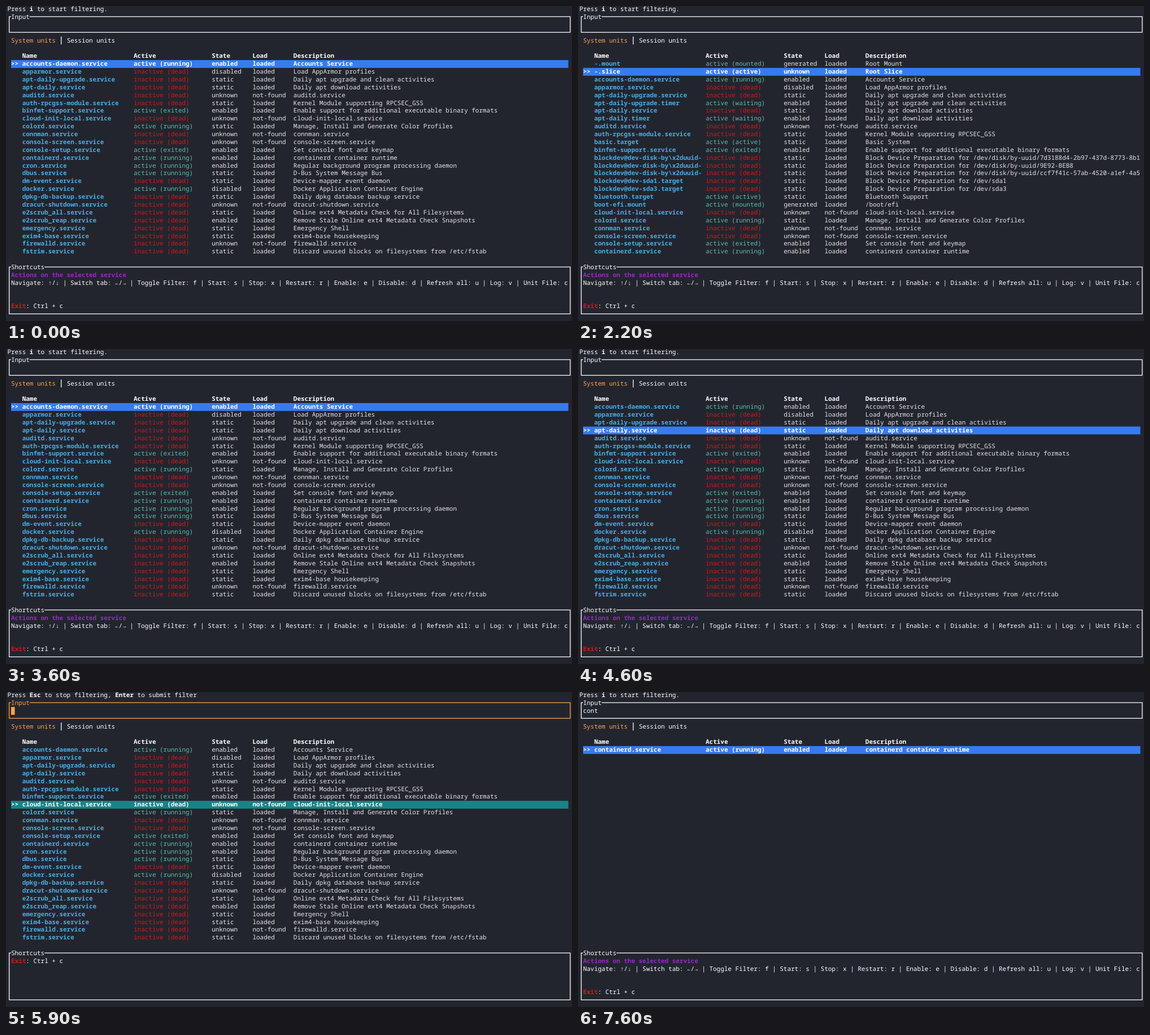
Write an HTML page that moves like this. It is 1002 px wide and 559 px high and loops after 8 s.

```html
<!DOCTYPE html>
<html lang="en">
<head>
<meta charset="utf-8">
<title>Service list</title>
<style>
html, body { margin: 0; width: 100%; height: 100%; overflow: hidden; background: #23252e; }
svg { display: block; }
text {
  font: 10.96px "Noto Sans Mono", "DejaVu Sans Mono", monospace;
  font-variant-ligatures: none;
  text-rendering: geometricPrecision;
  white-space: pre;
}
text.bold { font-weight: 700; }
</style>
</head>
<body>
<svg id="screen" width="1002" height="559"></svg>
<script>
const CELL = 6.577, LINE = 13.88, LEFT = 2.4, TOP = -1.2;
const LOOP = 8000, VISIBLE = 25;
const WHITE = '#fff', GREY = '#e6e6e6', RED = '#d41919', GREEN = '#5ebdab',
  ORANGE = '#fea44c', BLUE = '#367bf0', TEAL = '#198388', SKY = '#49aee6', PURPLE = '#962ac3';

const ACTIVE = {
  d: 'inactive (dead)', r: 'active (running)', e: 'active (exited)',
  m: 'active (mounted)', a: 'active (active)', w: 'active (waiting)'
};
const STATE = { e: 'enabled', d: 'disabled', s: 'static', u: 'unknown', g: 'generated' };

// Each line: name, active and state codes, description (none means the unit was not found).
const units = String.raw`
-.mount mg Root Mount
-.slice au Root Slice
accounts-daemon.service re Accounts Service
apparmor.service dd Load AppArmor profiles
apt-daily-upgrade.service ds Daily apt upgrade and clean activities
apt-daily-upgrade.timer we Daily apt upgrade and clean activities
apt-daily.service ds Daily apt download activities
apt-daily.timer we Daily apt download activities
auditd.service du
auth-rpcgss-module.service ds Kernel Module supporting RPCSEC_GSS
basic.target as Basic System
binfmt-support.service ee Enable support for additional executable binary formats
blockdev@dev-disk-by\x2duuid- ds Block Device Preparation for /dev/disk/by-uuid/7d3188d4-2b97-437d-8773-8b1
blockdev@dev-disk-by\x2duuid- ds Block Device Preparation for /dev/disk/by-uuid/9E92-BEB8
blockdev@dev-disk-by\x2duuid- ds Block Device Preparation for /dev/disk/by-uuid/ccf7f41c-57ab-4520-a1ef-4a5
blockdev@dev-sda1.target ds Block Device Preparation for /dev/sda1
blockdev@dev-sda3.target ds Block Device Preparation for /dev/sda3
bluetooth.target as Bluetooth Support
boot-efi.mount mg /boot/efi
cloud-init-local.service du
colord.service rs Manage, Install and Generate Color Profiles
connman.service du
console-screen.service du
console-setup.service ee Set console font and keymap
containerd.service re containerd container runtime
cron.service re Regular background program processing daemon
dbus.service rs D-Bus System Message Bus
dm-event.service ds Device-mapper event daemon
docker.service rd Docker Application Container Engine
dpkg-db-backup.service ds Daily dpkg database backup service
dracut-shutdown.service du
e2scrub_all.service ds Online ext4 Metadata Check for All Filesystems
e2scrub_reap.service de Remove Stale Online ext4 Metadata Check Snapshots
emergency.service ds Emergency Shell
exim4-base.service ds exim4-base housekeeping
firewalld.service du
fstrim.service ds Discard unused blocks on filesystems from /etc/fstab
ldconfig.service ds Rebuild Dynamic Linker Cache
modprobe@configfs.service ds Load Kernel Module configfs
systemd-ask-password-console.service ds Dispatch Password Requests to Console
systemd-confext.service dd Merge System Configuration Images into /etc/
systemd-machine-id-commit.service es Save Transient machine-id to Disk
systemd-vconsole-setup.service du`.trim().split('\n').map(line => {
  const [name, codes, ...words] = line.split(' ');
  return {
    name, active: ACTIVE[codes[0]], state: STATE[codes[1]],
    load: words.length ? 'loaded' : 'not-found', about: words.join(' ') || name
  };
});

const x = col => LEFT + col * CELL;
const y = line => TOP + line * LINE;

const text = (col, line, str, color = WHITE, bold = false) =>
  `<text x="${x(col)}" y="${y(line) + 10.2}" fill="${color}"${bold ? ' class="bold"' : ''}>${str}</text>`;

const fill = (col, line, cols, color) =>
  `<rect x="${x(col)}" y="${y(line)}" width="${cols * CELL}" height="${LINE}" fill="${color}"/>`;

const stroke = (d, color) => `<path d="${d}" fill="none" stroke="${color}" stroke-width="1.3"/>`;

function box(first, last, title, color) {
  const l = x(0.5), r = x(151.5), t = y(first) + 6.2, b = y(last) + 6.2;
  return stroke(`M${x(1)} ${t}H${l}V${b}H${r}V${t}H${x(1 + title.length)}`, color) +
    text(1, first, title, color);
}

function row(unit, line, selectColor) {
  const { name, active, state, load, about } = unit;
  const pick = color => selectColor ? WHITE : color;
  const bold = !!selectColor;
  return (bold ? fill(1, line, 150, selectColor) + text(1, line, '>>', WHITE, true) : '') +
    text(4, line, name.slice(0, 29), pick(SKY), true) +
    text(34, line, active, pick(active[0] === 'i' ? RED : GREEN), bold) +
    text(55, line, state, pick(GREY), bold) +
    text(66, line, load, pick(GREY), bold) +
    text(77, line, about, pick(GREY), bold);
}

const passed = (t, times) => times.filter(at => t >= at).length;

function stateAt(t) {
  return {
    all: t >= 500 && t < 3600,
    editing: t >= 5900 && t < 7600,
    query: 'cont'.slice(0, passed(t, [6500, 6700, 6900, 7100])),
    selected: t < 3600 ? passed(t, [2200, 2400, 2600, 2900])
      : t < 6500 ? passed(t, [4200, 4400, 4600, 4800, 5000, 5200, 5400]) : 0
  };
}

function draw({ all, editing, query, selected }) {
  const accent = editing ? ORANGE : WHITE;
  const rows = units
    .filter(u => (all || u.name.endsWith('.service')) && u.name.includes(query))
    .slice(0, VISIBLE);

  const hint = editing
    ? text(0, 0, 'Press') + text(6, 0, 'Esc', WHITE, true) + text(10, 0, 'to stop filtering,') +
      text(29, 0, 'Enter', WHITE, true) + text(35, 0, 'to submit filter')
    : text(0, 0, 'Press') + text(6, 0, 'i', WHITE, true) + text(8, 0, 'to start filtering.');

  const input = box(1, 3, 'Input', accent) + text(1, 2, query, accent) +
    (editing ? fill(1 + query.length, 2, 1, ORANGE) : '');

  const tabs = text(1, 4, 'System units', ORANGE) + text(16, 4, 'Session units') +
    stroke(`M${x(14.5)} ${y(4)}V${y(5)}`, WHITE);

  const head = [[4, 'Name'], [34, 'Active'], [55, 'State'], [66, 'Load'], [77, 'Description']]
    .map(([col, label]) => text(col, 6, label, WHITE, true)).join('');

  const table = rows.map((u, i) =>
    row(u, 7 + i, i === selected && (editing ? TEAL : BLUE))).join('');

  const exitLine = editing ? 34 : 38;
  const help = box(33, 39, 'Shortcuts', WHITE) +
    (editing ? '' : text(1, 34, 'Actions on the selected service', PURPLE, true) +
      text(1, 35, 'Navigate: ↑/↓ | Switch tab: ←/→ | Toggle Filter: f | Start: s | Stop: x | ' +
        'Restart: r | Enable: e | Disable: d | Refresh all: u | Log: v | Unit File: c')) +
    text(1, exitLine, 'Exit', RED, true) + text(5, exitLine, ': Ctrl + c');

  return hint + input + tabs + head + table + help;
}

const screen = document.getElementById('screen');
const start = performance.now();
let shown = '';

function tick() {
  const state = stateAt((performance.now() - start) % LOOP);
  const key = JSON.stringify(state);
  if (key !== shown) {
    screen.innerHTML = draw(state);
    shown = key;
  }
  requestAnimationFrame(tick);
}
tick();
</script>
</body>
</html>
```
